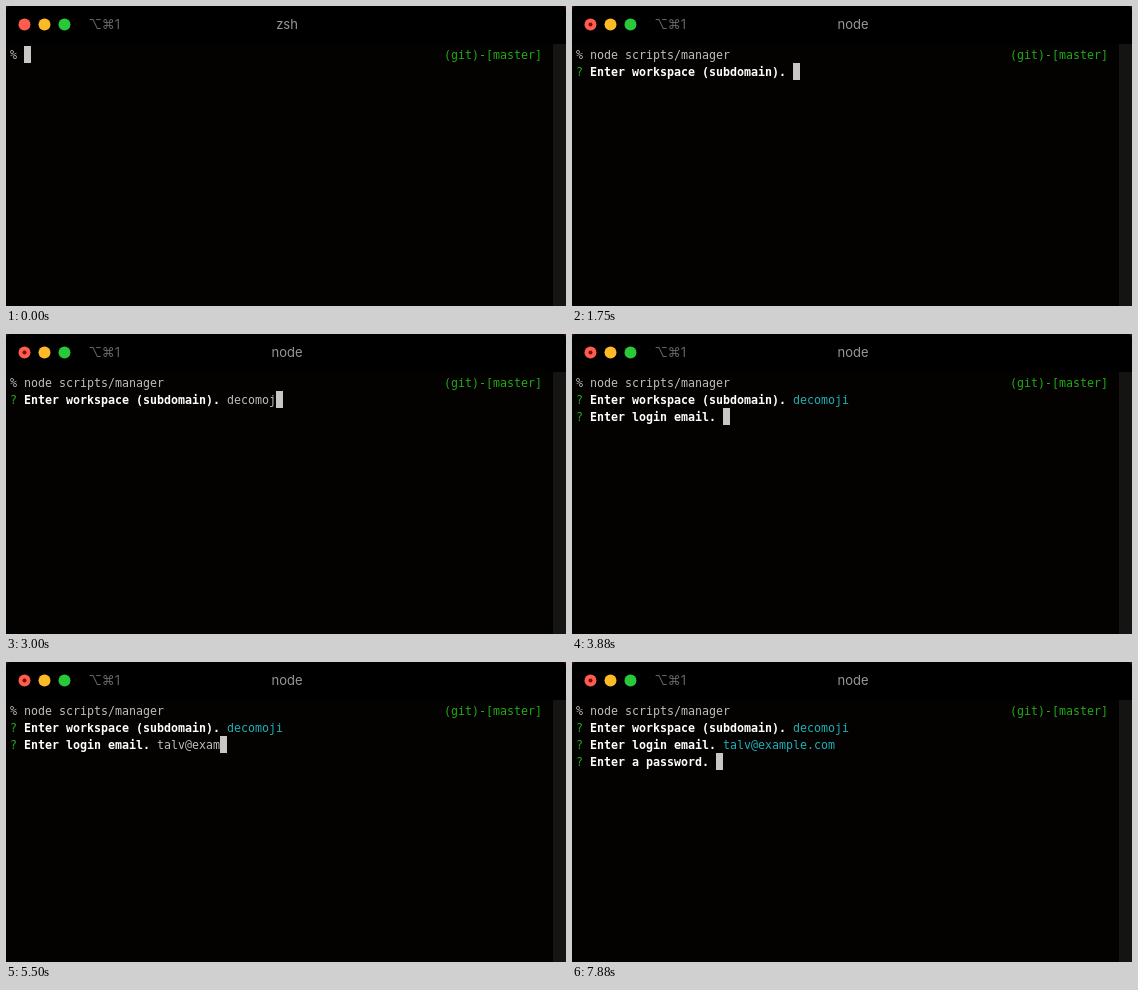
These frames come from a looping animation (560 px wide and 300 px high, 8000 ms). An HTML page with a canvas:

```html
<!DOCTYPE html>
<html lang="en">
<head>
<meta charset="utf-8">
<title>Terminal</title>
<style>
html, body { margin: 0; width: 100%; height: 100%; overflow: hidden; background: #000; }
canvas { display: block; }
</style>
</head>
<body>
<canvas id="stage" width="560" height="300"></canvas>
<script>
const ctx = document.getElementById('stage').getContext('2d');
const LOOP = 8000;
const COL = 7, ROW = 17, LEFT = 4, TOP = 40;
const MONO = '11.63px "DejaVu Sans Mono", "Liberation Mono", monospace';
const SANS = '13px Inter, "DejaVu Sans", sans-serif';
const GREY = '#bebebe', GREEN = '#20aa16', CYAN = '#1eb0b6';

const COMMAND = 'node scripts/manager';
const RUN = 500, ENTER = 1130, START = 1380;

// Each prompt: when it is shown, when it is answered, and when each key lands.
const prompts = [
  { at: 1630, done: 3380, label: 'Enter workspace (subdomain).', answer: 'decomoji',
    keys: [2130, 2380, 2500, 2630, 2750, 2880, 3000, 3130] },
  { at: 3380, done: 6880, label: 'Enter login email.', answer: 'talv@example.com',
    keys: [4130, 4380, 4500, 4750, 4880, 5130, 5250, 5380,
           5500, 5630, 5750, 5880, 6000, 6130, 6250, 6380] },
  { at: 6880, done: Infinity, label: 'Enter a password.', answer: '', keys: [] }
];

function put(text, col, row, color, bold) {
  ctx.font = (bold ? 'bold ' : '') + MONO;
  ctx.fillStyle = color;
  ctx.fillText(text, LEFT + col * COL, TOP + row * ROW + 13);
}

function rect(x, y, w, h, color) {
  ctx.fillStyle = color;
  ctx.fillRect(x, y, w, h);
}

function dot(x, y, r, color) {
  ctx.fillStyle = color;
  ctx.beginPath();
  ctx.arc(x, y, r, 0, Math.PI * 2);
  ctx.fill();
}

function frame() {
  rect(0, 0, 560, 300, '#2c0f0c');
  ctx.fillStyle = '#000';
  ctx.beginPath();
  ctx.roundRect(0, 0, 560, 300, [5, 5, 0, 0]);
  ctx.fill();
  rect(0, 38, 547, 262, '#040101');
  rect(547, 38, 13, 262, '#141412');
}

function titleBar(running) {
  dot(18.5, 18.5, 6, '#ff5c50');
  dot(38.5, 18.5, 6, '#fdba27');
  dot(58.5, 18.5, 6, '#28c83a');
  if (running) dot(18.5, 18.5, 2, '#7a0c00');
  ctx.font = SANS;
  ctx.fillStyle = '#646464';
  ctx.fillText('⌥⌘1', 82.5, 23);
  ctx.fillStyle = '#979797';
  ctx.textAlign = 'center';
  ctx.fillText(running ? 'node' : 'zsh', 281, 23);
  ctx.textAlign = 'left';
}

function draw(t) {
  const running = t >= START;
  frame();
  titleBar(running);

  put('%', 0, 0, GREY);
  put('(git)-[master]', 62, 0, GREEN);
  if (t >= RUN) put(COMMAND, 2, 0, GREY);

  let caret = t < RUN ? [2, 0] : t < ENTER ? [2 + COMMAND.length, 0] : [0, 1];
  prompts.forEach((p, i) => {
    if (t < p.at) return;
    const row = i + 1, start = p.label.length + 3;
    const typed = p.keys.filter(k => t >= k).length;
    put('?', 0, row, GREEN);
    put(p.label, 2, row, '#fff', true);
    put(p.answer.slice(0, typed), start, row, t >= p.done ? CYAN : GREY);
    caret = [start + typed, row];
  });
  rect(LEFT + caret[0] * COL, TOP + caret[1] * ROW, COL, ROW, '#c7c7c7');
}

function tick() {
  draw(performance.now() % LOOP);
  requestAnimationFrame(tick);
}
tick();
</script>
</body>
</html>
```
